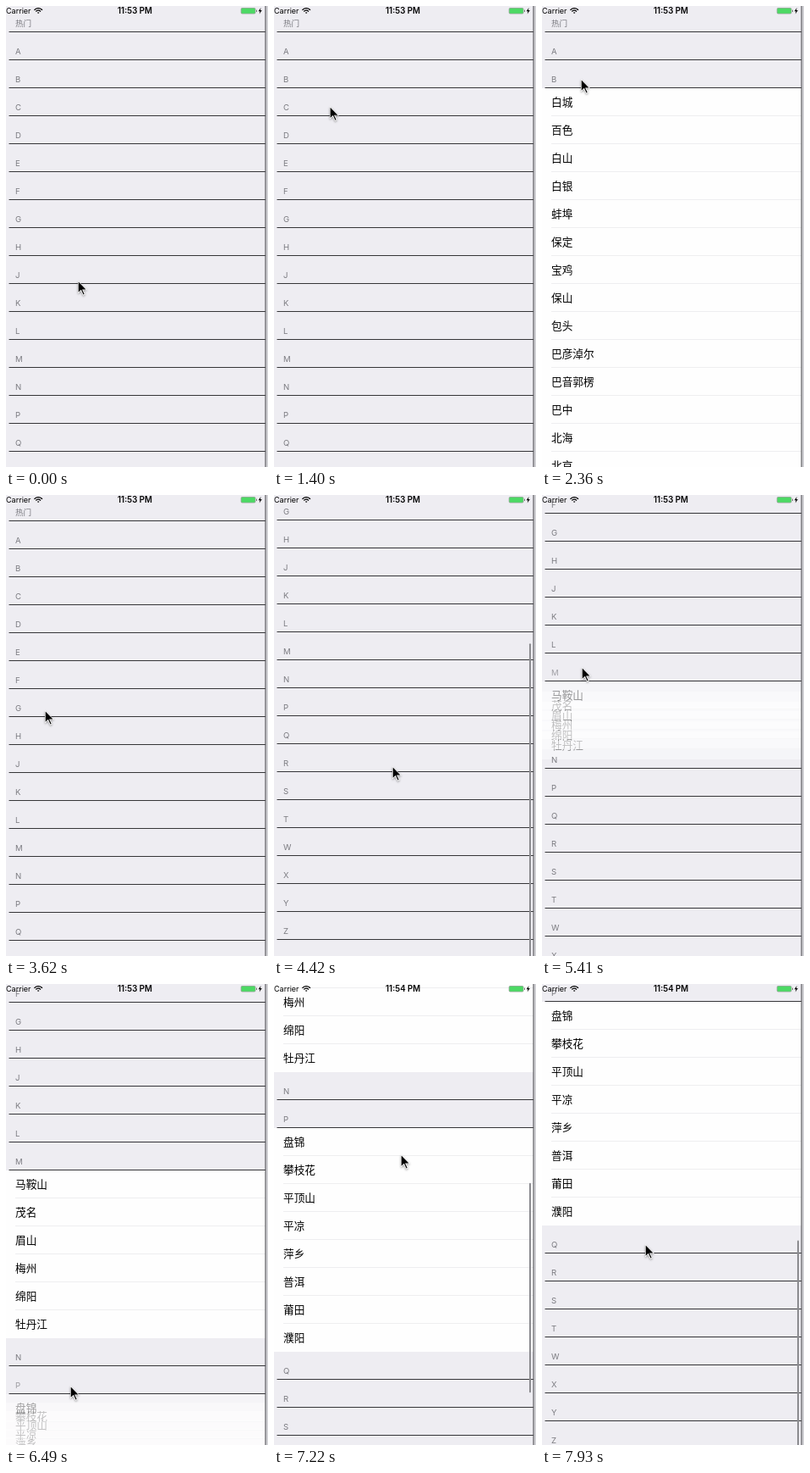
Write an HTML page with a canvas that moves like this. It is 310 px wide and 544 px high and loops after 7990 ms.

```html
<!DOCTYPE html>
<html lang="zh-CN">
<head>
<meta charset="utf-8">
<title>City list</title>
<style>
html, body { margin: 0; width: 100%; height: 100%; overflow: hidden; background: #eeedf2; }
canvas { display: block; width: 310px; height: 544px; }
</style>
</head>
<body>
<canvas id="stage"></canvas>
<script>
const LOOP = 7990, W = 310, H = 544, ROW = 33, VIEW = 549, TOGGLE = 300;
const SANS = 'Inter, Roboto, sans-serif';
const CJK = '"Noto Sans CJK SC", "Noto Sans CJK", sans-serif';
const titles = ['热门', ...'ABCDEFGHJKLMNPQRSTWXYZ'];
const cities = {
  B: '白城 百色 白山 白银 蚌埠 保定 宝鸡 保山 包头 巴彦淖尔 巴音郭楞 巴中 北海 北京 本溪 毕节 滨州 亳州'.split(' '),
  M: '马鞍山 茂名 眉山 梅州 绵阳 牡丹江'.split(' '),
  P: '盘锦 攀枝花 平顶山 平凉 萍乡 普洱 莆田 濮阳'.split(' ')
};
const opens = { B: 1800, M: 5290, P: 6380 };
const closes = { B: 3240 };

// The pointer rests between moves: start, duration, destination x and y.
const home = [85, 324];
const moves = [
  [40, 720, 74, 257], [1000, 220, 67, 120], [1360, 300, 46, 86],
  [3300, 320, 46, 254], [3860, 400, 140, 320], [4730, 390, 47, 203],
  [5740, 460, 76, 474], [6860, 340, 150, 201], [7300, 400, 122, 307]
];
const flicks = [{ start: 3980, end: 5000 }, { start: 6930, end: LOOP }];

const canvas = document.getElementById('stage');
const ctx = canvas.getContext('2d');
const ratio = window.devicePixelRatio || 1;
canvas.width = W * ratio;
canvas.height = H * ratio;

const ramp = (t, start, length) => Math.max(0, Math.min(1, (t - start) / length));
const smooth = p => p * p * (3 - 2 * p);

// Damped step response: 12% overshoot, first peak after 440 ms.
function spring(t) {
  if (t <= 0) return 0;
  const w = Math.PI / 440, decay = -Math.log(0.12) / 440;
  return 1 - Math.exp(-decay * t) * (Math.cos(w * t) + decay / w * Math.sin(w * t));
}

const scrollAt = t =>
  207 * spring(t - flicks[0].start) + 463 * (1 - (1 - ramp(t, flicks[1].start, 926)) ** 3);

const openness = (name, t) =>
  name in opens ? ramp(t, opens[name], TOGGLE) - ramp(t, closes[name] ?? LOOP, TOGGLE) : 0;

const cursorAt = t => moves.reduce(([x, y], [start, length, toX, toY]) => {
  const p = smooth(ramp(t, start, length));
  return [x + (toX - x) * p, y + (toY - y) * p];
}, home);

function rect(x, y, w, h, color) {
  ctx.fillStyle = color;
  ctx.fillRect(x, y, w, h);
}

function text(str, x, y, font, color) {
  ctx.font = font;
  ctx.fillStyle = color;
  ctx.fillText(str, x, y);
}

function pill(x, y, w, h, r, color) {
  ctx.fillStyle = color;
  ctx.beginPath();
  ctx.roundRect(x, y, w, h, r);
  ctx.fill();
}

function polygon(points, color) {
  ctx.beginPath();
  points.forEach(([x, y]) => ctx.lineTo(x, y));
  ctx.closePath();
  ctx.fillStyle = color;
  ctx.fill();
}

function drawRows(rows, top, open) {
  const step = ROW * smooth(open);
  ctx.globalAlpha = open;
  for (let i = rows.length - 1; i >= 0; i--) {
    const y = Math.round(top + i * step);
    rect(0, y, 307, ROW, '#fefefe');
    if (i < rows.length - 1) rect(11, y + ROW - 1, 296, 1, '#eeeef0');
    text(rows[i], 11, y + 20.5, '12.7px ' + CJK, '#000');
  }
  ctx.globalAlpha = 1;
}

function drawTable(t, scroll) {
  let line = 30 - scroll;
  const headers = titles.map(name => {
    const open = openness(name, t), rows = cities[name] || [];
    const header = { name, open, line: Math.round(line) };
    if (open > 0) drawRows(rows, header.line + 1, open);
    line += ROW * (1 + rows.length * smooth(open));
    return header;
  });
  for (const { name, open, line } of headers) {
    rect(3.5, line, 303.5, 1, '#353538');
    ctx.globalAlpha = 0.6 + 0.4 * Math.abs(2 * open - 1);
    text(name, 11, line - 6.5, '9.6px ' + (name === '热门' ? CJK : SANS), '#7b7b80');
    ctx.globalAlpha = 1;
  }
  return line - ROW + scroll;
}

function drawIndicator(t, scroll, content) {
  const over = Math.max(0, scroll - (content - VIEW));
  const top = (scroll - over) * VIEW / content + over;
  const height = VIEW * VIEW / content - over;
  for (const { start, end } of flicks) {
    ctx.globalAlpha = ramp(t, start, 60) * (1 - ramp(t, end, 250));
    pill(302, top, 2, height, 1, '#8c8c90');
  }
  ctx.globalAlpha = 1;
}

function drawStatus(t) {
  text('Carrier', 0, 9, '9px ' + SANS, '#000');
  text(t < 6500 ? '11:53 PM' : '11:54 PM', 132, 9, '600 9.7px ' + SANS, '#000');
  ctx.strokeStyle = '#000';
  ctx.lineWidth = 1.3;
  for (const r of [1, 3.8, 6.3]) {
    ctx.beginPath();
    ctx.arc(38.2, 9, r, -Math.PI * 0.77, -Math.PI * 0.23);
    ctx.stroke();
  }
  pill(277.7, 2, 17.8, 7.6, 1.8, '#a0a8a2');
  pill(278.5, 2.8, 16.2, 6, 1.2, '#4cd964');
  pill(296, 4.6, 1, 2.4, 0.5, '#777');
  polygon([[301.6, 2], [298.6, 6.3], [300.5, 6.3], [299.7, 9.4], [302.8, 5.1], [300.9, 5.1]], '#000');
}

function drawCursor(x, y) {
  ctx.save();
  ctx.translate(x, y);
  ctx.shadowColor = 'rgba(0,0,0,.4)';
  ctx.shadowBlur = 2.5 * ratio;
  ctx.shadowOffsetY = ratio;
  polygon([[0, 0], [0, 15.5], [3.6, 12.2], [6.1, 17.8], [8.8, 16.6], [6.4, 11.2], [11.2, 11.2]], '#fff');
  ctx.shadowColor = 'transparent';
  polygon([[0.7, 1.6], [0.7, 13.8], [3.9, 10.8], [6.5, 16.6], [7.7, 16], [5.1, 10.4], [9.5, 10.4]], '#000');
  ctx.restore();
}

function draw(t) {
  ctx.setTransform(ratio, 0, 0, ratio, 0, 0);
  rect(0, 0, W, H, '#eeedf2');
  const scroll = scrollAt(t);
  drawIndicator(t, scroll, drawTable(t, scroll));
  drawStatus(t);
  rect(307, 0, 3, H, '#cfcfd3');
  rect(306.5, 0, 1, H, '#4c4c50');
  drawCursor(...cursorAt(t));
}

const start = performance.now();
function tick() {
  draw((performance.now() - start) % LOOP);
  requestAnimationFrame(tick);
}
tick();
</script>
</body>
</html>
```
